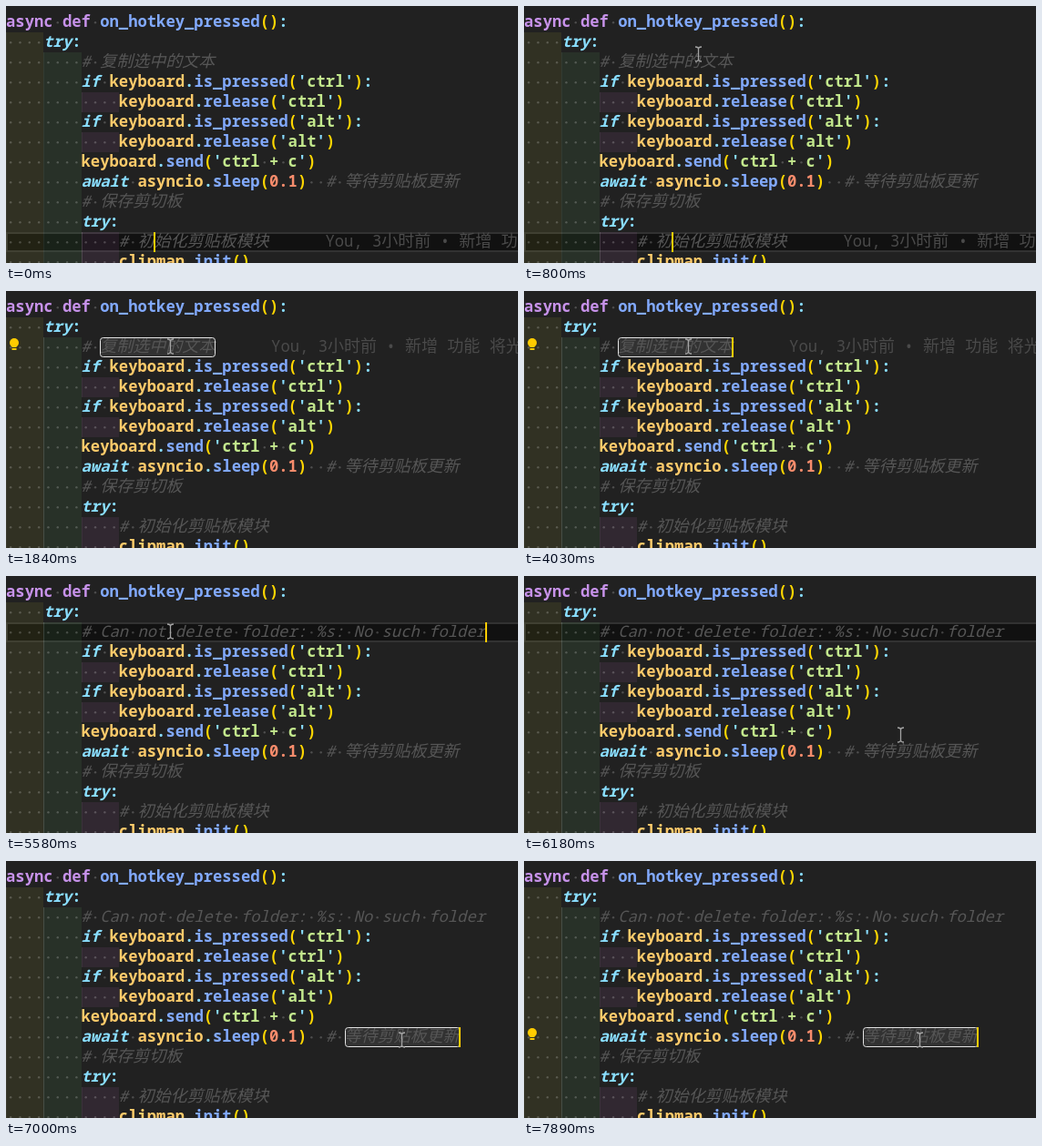
These frames come from a looping animation (562 by 283 pixels, 8000 ms). An HTML page with a canvas:

```html
<!DOCTYPE html>
<html lang="zh-CN">
<head>
<meta charset="utf-8">
<style>
  html, body { margin: 0; width: 100%; height: 100%; overflow: hidden; background: #212121; }
  canvas { display: block; }
</style>
</head>
<body>
<canvas id="stage" width="562" height="283"></canvas>
<script>
const ctx = document.getElementById('stage').getContext('2d');
const W = 562, H = 283, LOOP = 8000;
const SIZE = 17.2, CH = SIZE * 0.6, CJK = 18;
const ROW = 22, TOP = 7, BASE = 16;

const C = {
  bg: '#212121', key: '#c792ea', flow: '#89ddff', punct: '#89ddff', func: '#82aaff',
  name: '#ffcb6b', str: '#c3e88d', num: '#f78c6c', paren: '#ffd700',
  comment: '#565656', blame: '#4a4a4a', dot: 'rgba(255,255,255,0.2)', caret: '#ffcc00',
  guide: 'rgba(255,255,255,0.05)', activeGuide: 'rgba(255,255,255,0.14)', border: '#323232'
};
const TINTS = ['rgba(255,255,64,0.07)', 'rgba(127,255,127,0.07)', 'rgba(255,127,255,0.07)'];

const LINES = [
  [0, 'async def on_hotkey_pressed():'],
  [1, 'try:'],
  [2, '# 复制选中的文本'],
  [2, "if keyboard.is_pressed('ctrl'):"],
  [3, "keyboard.release('ctrl')"],
  [2, "if keyboard.is_pressed('alt'):"],
  [3, "keyboard.release('alt')"],
  [2, "keyboard.send('ctrl + c')"],
  [2, 'await asyncio.sleep(0.1)  # 等待剪贴板更新'],
  [2, '# 保存剪切板'],
  [2, 'try:'],
  [3, '# 初始化剪贴板模块'],
  [3, 'clipman.init()']
];
const REPLACED = '# Can not delete folder: %s: No such folder';
const BLAME = 'You, 3小时前 • 新增 功能 将光标';

// [start, x, row]; a start alone hides the caret
const CARETS = [
  [0, 162, 11], [1170, 174, 2], [1320, 228, 2], [1840], [4030, 228, 2], [4780],
  [5350, 526, 2], [5850], [6430, 443, 8], [6820, 425, 8], [7000, 497, 8], [7470], [7890, 497, 8]
];

const TOKEN = /#.*|'[^']*'|\d+\.\d+|\w+(?=\()|\w+|[()]|\s+|[^\s\w]/g;
const rowTop = r => TOP + r * ROW;
const within = (t, a, b) => t >= a && t < b;

function box(x, y, w, h, color) {
  ctx.fillStyle = color;
  ctx.fillRect(x, y, w, h);
}

// Draws mixed Latin and Chinese text, returns the x where it ends
function run(text, x, row, color, { italic = false, weight = 600, dots = true } = {}) {
  const top = rowTop(row);
  const slant = italic ? 'italic ' : '';
  for (const part of text.match(/[\u4e00-\u9fff]+|[^\u4e00-\u9fff]+/g)) {
    const wide = part >= '\u4e00';
    ctx.font = wide
      ? slant + '300 ' + CJK + 'px "Noto Sans CJK SC", "Noto Sans CJK", sans-serif'
      : slant + weight + ' ' + SIZE + 'px "Noto Sans Mono", monospace';
    ctx.fillStyle = color;
    ctx.fillText(part, x, top + BASE);
    if (dots && !wide) {
      [...part].forEach((c, i) => { if (c === ' ') dot(x + (i + 0.5) * CH, top); });
    }
    x += part.length * (wide ? CJK : CH);
  }
  return x;
}

function dot(x, top) {
  ctx.fillStyle = C.dot;
  ctx.beginPath();
  ctx.arc(x, top + 11.3, 1.2, 0, 7);
  ctx.fill();
}

function style(token, next) {
  if (token[0] === '#') return [C.comment, { italic: true, weight: 400 }];
  if (/^(async|def)$/.test(token)) return [C.key];
  if (/^(try|if|await)$/.test(token)) return [C.flow, { italic: true }];
  if (/^\d/.test(token)) return [C.num];
  if (/^\w/.test(token)) return [next === '(' ? C.func : C.name];
  return [/[()]/.test(token) ? C.paren : C.punct];
}

function drawIndent(row, indent, [level, start]) {
  const top = rowTop(row);
  for (let i = 0; i < indent; i++) {
    const x0 = Math.round(i * 4 * CH), x1 = Math.round((i + 1) * 4 * CH);
    box(x0, top, x1 - x0, ROW, TINTS[i]);
    box(x0, top, 1, ROW, i === level && row >= start ? C.activeGuide : C.guide);
  }
  for (let i = 0; i < indent * 4; i++) dot((i + 0.5) * CH, top);
}

function drawLine(row, indent, text) {
  let x = indent * 4 * CH;
  const tokens = text.match(TOKEN);
  tokens.forEach((token, i) => {
    if (token[0] === "'") {
      x = run("'", x, row, C.punct);
      x = run(token.slice(1, -1), x, row, C.str);
      x = run("'", x, row, C.punct);
    } else {
      x = run(token, x, row, ...style(token, tokens[i + 1]));
    }
  });
  return x;
}

function activeRow(t) {
  if (t < 1170) return 11;
  if (t < 1320 || within(t, 5300, 6430)) return 2;
  return within(t, 6430, 7000) ? 8 : -1;
}

function drawActive(row) {
  const y = rowTop(row);
  box(0, y, W, ROW, C.border);
  box(2, y + 2, W, ROW - 4, '#111111');
}

function drawSelection(x, row, fill) {
  ctx.beginPath();
  ctx.roundRect(x + 0.5, rowTop(row) + 0.5, 126, ROW - 1, 3);
  if (fill) {
    ctx.fillStyle = '#323232';
    ctx.fill();
  } else {
    ctx.strokeStyle = '#e4e4e4';
    ctx.lineWidth = 1;
    ctx.stroke();
  }
}

function drawBulb(row) {
  const y = rowTop(row);
  ctx.fillStyle = C.caret;
  ctx.beginPath();
  ctx.arc(9, y + 6, 5, 0, 7);
  ctx.fill();
  box(6.5, y + 8, 5, 3, C.caret);
  box(6.5, y + 12, 5, 2, C.caret);
}

function drawPointer([px, py]) {
  const x = Math.round(px) + 0.5, y = Math.round(py);
  ctx.beginPath();
  ctx.moveTo(x - 3.5, y - 8);
  ctx.quadraticCurveTo(x, y - 8, x, y - 5.5);
  ctx.quadraticCurveTo(x, y - 8, x + 3.5, y - 8);
  ctx.moveTo(x, y - 6);
  ctx.lineTo(x, y + 6);
  ctx.moveTo(x - 3.5, y + 8);
  ctx.quadraticCurveTo(x, y + 8, x, y + 5.5);
  ctx.quadraticCurveTo(x, y + 8, x + 3.5, y + 8);
  ctx.strokeStyle = '#a4a4a4';
  ctx.lineWidth = 1.3;
  ctx.stroke();
}

// Eased point on a quadratic curve, advancing in even time steps
function glide(t, start, end, steps, a, b, c) {
  const k = Math.floor((t - start) / (end - start) * (steps - 1)) + 1;
  const p = Math.min(k / steps, 1), s = p * p * (3 - 2 * p), r = 1 - s;
  return [0, 1].map(i => r * r * a[i] + 2 * r * s * b[i] + s * s * c[i]);
}

function pointer(t) {
  if (t < 330) return null;
  if (t < 5760) return glide(t, 330, 990, 15, [86, 296], [225, 0], [180, 61]);
  if (t < 6620) return glide(t, 5760, 6230, 11, [180, 61], [300, 105], [437, 190]);
  return t < 6660 ? [436, 193] : [434, 197];
}

function draw(t) {
  box(0, 0, W, H, C.bg);
  const active = activeRow(t);
  const selected = within(t, 1320, 5300) ? [103, 2] : t >= 7000 ? [372, 8] : null;
  const blame = t < 1170 ? 11 : within(t, 1400, 5300) ? 2 : -1;
  const guide = t < 1170 ? [2, 11] : [1, 2];

  if (active >= 0) drawActive(active);
  if (selected) drawSelection(...selected, true);
  LINES.forEach(([indent, text], row) => {
    drawIndent(row, indent, guide);
    const end = drawLine(row, indent, row === 2 && t >= 5300 ? REPLACED : text);
    if (row === blame) run(BLAME, end + 6 * CH, row, C.blame, { weight: 400, dots: false });
  });
  if (selected) drawSelection(...selected, false);

  if (within(t, 1600, 5580)) drawBulb(2);
  if (t >= 7230) drawBulb(8);

  const [, x, row] = CARETS.filter(c => c[0] <= t).pop();
  if (x !== undefined) box(x, rowTop(row), 2, ROW, C.caret);

  const pos = pointer(t);
  if (pos) drawPointer(pos);
}

function tick() {
  draw(performance.now() % LOOP);
  requestAnimationFrame(tick);
}
tick();
</script>
</body>
</html>
```
